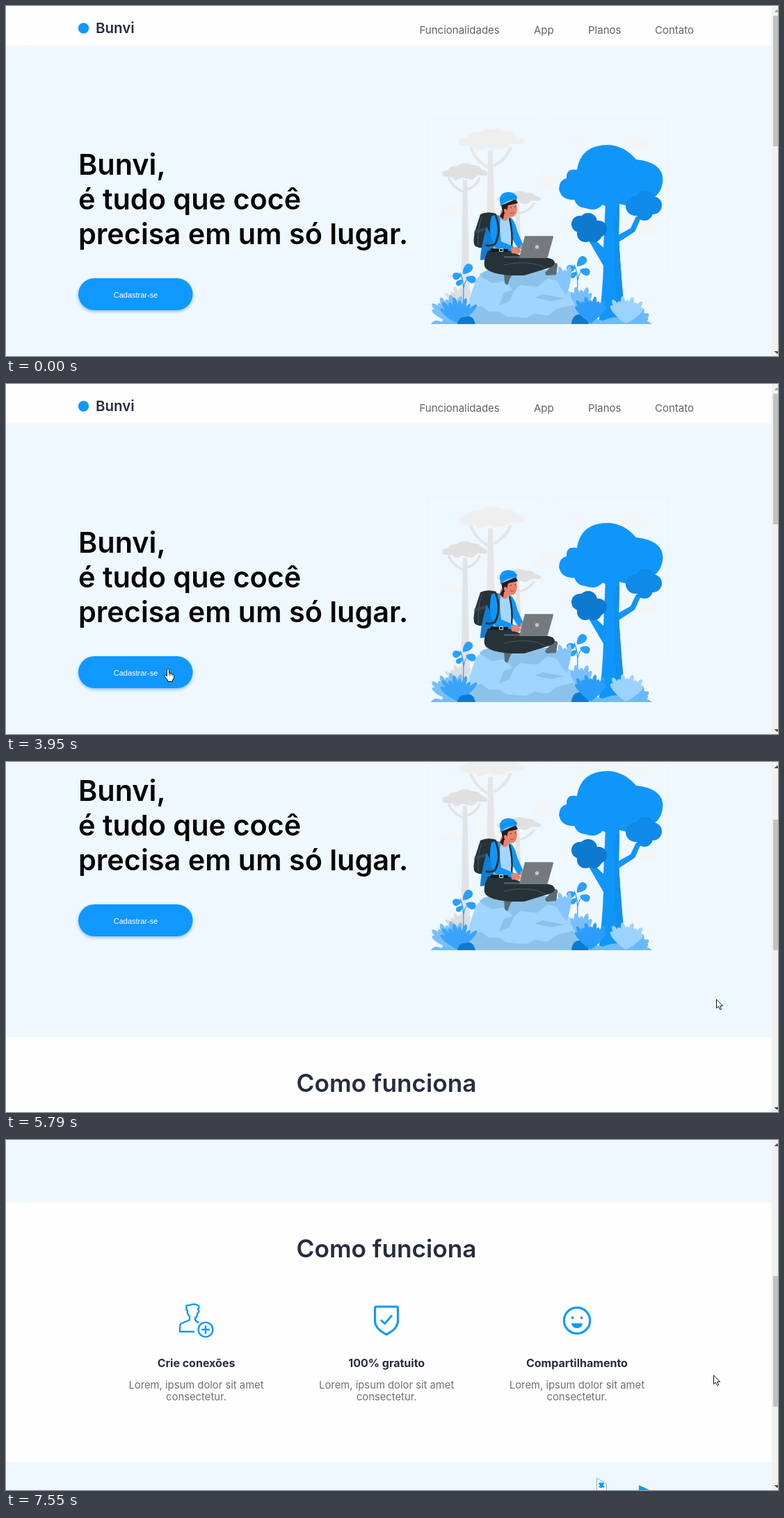
Recreate the animation shown at these times as an HTML page with a canvas. Size 1110 px wide and 504 px high, loop 8 s.

```html
<!DOCTYPE html>
<html lang="pt">
<head>
<meta charset="utf-8">
<title>Bunvi</title>
<style>
html, body { margin: 0; width: 100%; height: 100%; overflow: hidden; background: #fefefe; }
canvas { display: block; }
</style>
</head>
<body>
<canvas id="stage" width="1110" height="504"></canvas>
<script>
const ctx = document.getElementById('stage').getContext('2d');
const LOOP = 8000;
const BLUE = '#1098ff', TREE = '#1096f8', DARK = '#263238', INK = '#252d40';
const PALE = '#eff7ff', SKIN = '#e8836c', ROCK = '#9fd5ff', ROCK_SHADE = '#8cc2ea';
const SANS = 'Inter, sans-serif';

// ---------- drawing helpers ----------
function rect(color, x, y, w, h) {
  ctx.fillStyle = color;
  ctx.fillRect(x, y, w, h);
}
function fill(color, d) {
  ctx.fillStyle = color;
  ctx.fill(new Path2D(d));
}
function line(color, width, d) {
  ctx.strokeStyle = color;
  ctx.lineWidth = width;
  ctx.stroke(new Path2D(d));
}
function oval(color, x, y, rx, ry = rx) {
  ctx.fillStyle = color;
  ctx.beginPath();
  ctx.ellipse(x, y, rx, ry, 0, 0, Math.PI * 2);
  ctx.fill();
}
function ring(color, width, x, y, r) {
  ctx.strokeStyle = color;
  ctx.lineWidth = width;
  ctx.beginPath();
  ctx.arc(x, y, r, 0, Math.PI * 2);
  ctx.stroke();
}
function text(str, x, y, font, color, align = 'left') {
  ctx.font = font;
  ctx.fillStyle = color;
  ctx.textAlign = align;
  ctx.fillText(str, x, y);
}
function leaf(color, x, y, deg, len, w) {
  ctx.save();
  ctx.translate(x, y);
  ctx.rotate(deg * Math.PI / 180);
  fill(color, `M0 0C${len * .4} ${-w} ${len} ${-w} ${len} 0C${len} ${w} ${len * .4} ${w} 0 0Z`);
  ctx.restore();
}
// Leaves spread from one root; every second leaf is shorter
function fan(color, x, y, len, n, from, to, w = 4.5) {
  for (let i = 0; i < n; i++) {
    leaf(color, x, y, from + (to - from) * i / (n - 1), len * (i % 2 ? 1 : .86), w);
  }
}
function cloud(x, y, w) {
  fill('#f3f5f6', `M${x} ${y}q${w * .02} ${-w * .2} ${w * .22} ${-w * .2}q${w * .08} ${-w * .24} ${w * .3} ${-w * .22}` +
    `q${w * .2} ${w * .02} ${w * .22} ${w * .2}q${w * .24} 0 ${w * .26} ${w * .22}Z`);
}
// Flat savanna crown inside the box x, y, w, h
function crown(color, x, y, w, h) {
  const X = f => x + w * f, Y = f => y + h * f;
  fill(color, `M${X(.06)} ${Y(.78)}Q${X(-.04)} ${Y(.5)} ${X(.16)} ${Y(.4)}Q${X(.18)} ${Y(.16)} ${X(.36)} ${Y(.16)}` +
    `Q${X(.48)} ${Y(-.12)} ${X(.66)} ${Y(.12)}Q${X(.84)} ${Y(.12)} ${X(.86)} ${Y(.36)}Q${X(1.04)} ${Y(.5)} ${X(.97)} ${Y(.72)}` +
    `L${X(.78)} ${Y(.72)}L${X(.66)} ${Y(.98)}L${X(.47)} ${Y(.84)}L${X(.32)} ${Y(1)}L${X(.24)} ${Y(.82)}Z`);
}

// ---------- illustration ----------
function backdrop() {
  line('#edf5fc', 1, 'M606.5 390V162.5H770.5V390M785.5 390V162.5H951.5V390M575 429.5H985');
  cloud(806, 196, 27);
  cloud(878, 205, 48);
  cloud(756, 261, 46);
  cloud(626, 299, 30);
  cloud(903, 328, 38);

  fill('#e6e6e7', 'M693 208H700L705 390H690Z');
  line('#e6e6e7', 4, 'M668 203Q674 222 695 234M726 203Q718 222 701 230');
  crown('#efefef', 648, 176, 99, 32);
  fill('#e2e3e4', 'M657 250H663L667 430H654Z');
  line('#e2e3e4', 3.5, 'M636 247Q643 262 658 268M681 247Q677 260 663 264');
  crown('#e0e0e0', 625, 226, 68, 25);
  fill('#e2e3e4', 'M733 284H738L742 390H732Z');
  line('#e2e3e4', 3, 'M714 283Q720 295 734 302M760 283Q754 295 738 299');
  crown('#e0e0e0', 704, 266, 66, 20);
  fan('#dcdee0', 656, 432, 30, 7, -160, -65, 4);
}

function bigTree() {
  fill(TREE, 'M862 282H882L881 335Q885 400 891 458H852Q858 410 859 374L838 338L844 334L859 348Z');
  fill('#1190ee', 'M877 290H882L881 335Q885 400 891 458H882Q872 390 877 290Z');
  fill(TREE, 'M880 330L898 320L906 303L913 305L904 325L881 340Z');
  fill(TREE, 'M821 236Q826 200 866 200Q889 201 906 221Q944 225 944.5 250Q943 270 929 277Q905 292 882 285' +
    'Q871 295 858 286Q848 297 833 291Q821 290 817 279Q798 280 795 263Q796 250 806 248Q805 233 821 236Z');
  const right = '#0f8ae8', left = '#0e7acf';
  oval(right, 905, 288, 14);
  oval(right, 919, 280, 14);
  oval(right, 930, 287, 13);
  oval(right, 918, 297, 12);
  oval(left, 825, 314, 12);
  oval(left, 837, 311, 13);
  oval(left, 852, 321, 12);
  oval(left, 833, 328, 12);
  oval(left, 845, 328, 12);
}

function rock() {
  fill(ROCK, 'M663 458L666 422L676 394L687 382H790L800 402L814 414L831 458Z');
  fill(ROCK_SHADE, 'M663 458L664 436L684 432L694 440L709 440L719 447L748 449L760 443L779 446L792 436L816 430L831 458Z');
  fill(ROCK_SHADE, 'M681 386L694 380H788L797 397L779 392L764 404L739 402L730 410L717 396L699 399L684 391Z');
  fill(ROCK_SHADE, 'M716 413L731 408L724 425L709 431ZM760 420L772 415L803 421L784 425Z');
}

// Stems with broad leaves around a fork at x, y
function sprig(x, y) {
  const c = '#2a9ffb';
  line(c, 1.3, `M${x} ${y + 44}Q${x + 3} ${y + 12} ${x - 4} ${y - 2}M${x + 1} ${y + 20}Q${x + 3} ${y + 6} ${x + 13} ${y + 3}`);
  leaf(c, x, y, -48, 18, 8);
  leaf(c, x - 2, y + 1, 165, 13, 7);
  leaf(c, x + 4, y + 5, 18, 15, 7);
  leaf(c, x, y + 8, 140, 12, 5);
}

function plants() {
  sprig(657, 386);
  sprig(821, 375);
  fan('#86c5fb', 806, 416, 42, 4, -115, -84, 5);
  fan('#78bffa', 826, 440, 36, 5, -115, -60, 5);
  fill('#6fbbf9', 'M611 458Q616 450 626 455Q634 443 650 451L676 458ZM824 458Q834 445 858 453Q878 444 902 451Q920 450 929 458Z');
  fan('#78bffa', 642, 456, 40, 8, -148, -72, 5);
  fan('#3ba4fa', 650, 457, 38, 8, -140, -45, 4.5);
  fill('#0e7acf', 'M649 458Q651 446 661 448Q671 443 675 458ZM813 458Q814 444 825 444Q836 446 838 458Z');
  fan('#2c9dfa', 841, 457, 39, 9, -132, -50, 4.5);
  fan('#69b8fa', 903, 457, 25, 5, -70, -20, 5);
  fan('#9bd2ff', 891, 457, 39, 9, -130, -42, 5);
}

function person() {
  // backpack
  fill(DARK, 'M682 300Q692 295 705 299L699 346Q685 351 675 346Q670 342 675 322Z');
  fill('#37474f', 'M674 323L693 318L691 323L673 328Z');
  line('#455a64', 1, 'M684 304Q678 318 679 345');
  // shirt and jacket
  fill('#a5d6ff', 'M706 304L723 303L727 330L724 352H700Z');
  fill('#0f7ed5', 'M691 318L703 340L697 364L682 366Q682 350 691 318Z');
  fill(TREE, 'M723 303Q731 306 735 324L744 345L737 350L727 334Z');
  line(DARK, 2.5, 'M724 306Q729 325 727 347');
  fill(TREE, 'M698 303Q706 299 711 303Q709 320 712 339L731 347L727 355L703 348Q692 328 698 303Z');
  line(DARK, 3, 'M704 301Q713 324 703 343Q694 347 690 344');
  // head
  fill(SKIN, 'M712 294L724 299L722 307Q716 313 709 304Z');
  fill(SKIN, 'M716 286L733 281L735 292Q734 303 727 304Q718 303 715 292Z');
  fill('#211f24', 'M712 287L733 278L736 284L731 285L722 287L720 295L716 300L715 307L710 303L714 296Z');
  oval(SKIN, 718, 295, 2, 3);
  fill(BLUE, 'M711 288L710 279Q710 269 721 268Q731 267 735 275L734 279Q721 279 711 288Z');
  line('#0f7ed5', 1.1, 'M711 281Q720 273 734 275');
  oval(DARK, 726, 290, .8);
  oval(DARK, 732, 289, .8);
  line('#9c4a3c', 1, 'M725 298Q729 300 731 297');
  // legs and shoes
  fill('#5b6a72', 'M716 384L728 386L724 394L721 402L717 399ZM775 384L787 371Q793 368 793 374L791 387L777 388Z');
  fill(DARK, 'M693 352L718 350L746 362Q773 359 786 365Q794 372 781 377L745 388Q701 389 690 378Q684 371 693 352Z');
  line('#455a64', 1, 'M716 373Q740 367 763 372L776 377');
  fill('#151b1e', 'M697 349L722 350L721 354L696 354Z');
  line('#dfe5e8', 1, 'M709.5 349.5H714.5V353.5H709.5Z');
  // hands and laptop
  fill(SKIN, 'M726 348L734 347L741 353L737 357L727 356ZM741 343L746 346L744 351L738 350Z');
  fill('#50575b', 'M715 360H778L777 363H717Z');
  fill('#747a7e', 'M746 331H785Q787 331 787 333L779 361Q778 363 776 363H738Z');
  line('#8f9599', 1, 'M746 331.5H785');
  oval('#c3c7ca', 763.5, 347, 2.8);
}

// ---------- page ----------
function header() {
  oval(BLUE, 111.5, 32, 7.7);
  text('Bunvi', 129, 38.5, '600 20.5px ' + SANS, INK);
  const nav = { Funcionalidades: 594.5, App: 759, Planos: 837, Contato: 933 };
  for (const item in nav) text(item, nav[item], 39.5, '15px ' + SANS, '#5f6368');
}

function hero() {
  rect(PALE, 0, 57, 1101, 526);
  ['Bunvi,', 'é tudo que cocê', 'precisa em um só lugar.'].forEach((s, i) =>
    text(s, 104, 243 + 50 * i, '600 41.4px ' + SANS, '#050505'));
  ctx.save();
  ctx.shadowColor = 'rgba(20, 120, 210, .45)';
  ctx.shadowBlur = 4;
  ctx.shadowOffsetY = 2;
  ctx.fillStyle = BLUE;
  ctx.beginPath();
  ctx.roundRect(104, 392, 164.5, 46, 23);
  ctx.fill();
  ctx.restore();
  text('Cadastrar-se', 186.5, 419.5, '11px "Liberation Sans", Arial, sans-serif', '#fff', 'center');
  backdrop();
  bigTree();
  rock();
  plants();
  person();
}

function icons() {
  line(BLUE, 2.4, 'M271 769H250V762Q250 757 255 756L262 753Q265 752 264 747Q260 743 261 739Q258 737 260 735' +
    'Q257 730 264 731Q270 728 276 731Q279 733 276 737Q279 740 275 743Q275 748 272 749V752Q274 755 277 756');
  ring(BLUE, 2.4, 287, 766, 10.4);
  line(BLUE, 2.4, 'M287 760V772M281 766H293');
  line(BLUE, 3.2, 'M530.5 735Q530.5 733 532.5 733H561.5Q563.5 733 563.5 735V754Q563 765 547 773Q531 765 530.5 754Z');
  line(BLUE, 2.8, 'M539 752L544.5 757.5L555 745.5');
  ring(BLUE, 3.2, 821, 753, 18.7);
  oval(BLUE, 814.5, 749, 1.9);
  oval(BLUE, 827.5, 749, 1.9);
  fill(BLUE, 'M813 757H829Q828 764 821 764Q814 764 813 757Z');
}

function features() {
  text('Como funciona', 547, 662, '600 35.2px ' + SANS, INK, 'center');
  icons();
  ['Crie conexões', '100% gratuito', 'Compartilhamento'].forEach((title, i) => {
    const x = 273.5 + 273.7 * i;
    text(title, x, 820, '700 16px ' + SANS, INK, 'center');
    text('Lorem, ipsum dolor sit amet', x, 851, '14.8px ' + SANS, '#6c7076', 'center');
    text('consectetur.', x, 868, '14.8px ' + SANS, '#6c7076', 'center');
  });
}

function nextSection() {
  rect(PALE, 0, 957, 1101, 300);
  fill('#fafdff', 'M849 980L864 988V1008L849 1000Z');
  line('#6fbcf8', 1, 'M849.5 980L863.5 988V1008L849.5 1000Z');
  line(BLUE, 2.4, 'M856 986V994M852.5 987L860 993M853 993L859.5 987');
  fill(BLUE, 'M910 990L925 997H934V1010H910Z');
}

function scrollbar(y) {
  rect('#f1f1f1', 1101, 0, 9, 504);
  rect('#c1c1c1', 1103, Math.round(14 + .37 * y), 7, 188);
  fill(y > 0 ? '#505050' : '#a3a3a3', 'M1104.5 9L1108.5 5L1112.5 9Z');
  fill('#505050', 'M1104.5 497L1108.5 501L1112.5 497Z');
}

// ---------- motion ----------
// Bursts of movement: first step, last step, number of steps
const BURSTS = [[450, 1240, 13], [1320, 1520, 3], [2590, 3330, 12], [3400, 3400, 1], [3600, 4370, 12],
  [4440, 5190, 12], [5260, 6000, 12], [6210, 6280, 2], [6590, 6810, 4], [7000, 7550, 8]];
// Wheel notches: start, duration
const NOTCHES = [[5190, 320], [5470, 320], [5680, 320], [6590, 220], [7000, 320], [7230, 320]];
const NOTCH = 82.2;
// Pointer: time, x, y
const TRACK = [[384, 1074, 505], [1240, 1029, 386], [1520, 1011, 368], [2520, 1011, 368], [2800, 840, 328],
  [2990, 540, 317], [3330, 216, 404], [3400, 191, 414], [3530, 191, 414], [3950, 233, 409], [4370, 431, 406],
  [4720, 700, 385], [5190, 1034, 343], [5450, 1022, 342], [6000, 1020, 341], [6140, 1020, 341], [6280, 1017, 338]];

function snap(t) {
  const burst = BURSTS.filter(b => b[0] <= t).pop();
  if (!burst) return 0;
  const [start, end, n] = burst;
  if (n === 1) return start;
  const step = (end - start) / (n - 1);
  return start + step * Math.min(n - 1, Math.floor((t - start) / step + .25));
}
function ease(p) {
  return p < .5 ? 2 * p * p : 1 - 2 * (1 - p) ** 2;
}
function scrollAt(t) {
  const sum = NOTCHES.reduce((s, [start, dur]) => s + ease(Math.min(1, Math.max(0, (t - start) / dur))), 0);
  return Math.round(sum * NOTCH);
}
function pointerAt(t) {
  const next = TRACK.findIndex(k => k[0] > t);
  if (next === 0) return null;
  if (next < 0) return TRACK[TRACK.length - 1].slice(1);
  const a = TRACK[next - 1], b = TRACK[next], p = (t - a[0]) / (b[0] - a[0]);
  return [1, 2].map(i => Math.round(a[i] + (b[i] - a[i]) * p));
}

function pointer(x, y, scroll) {
  const py = y + scroll;
  const hand = x > 104 && x < 268 && py > 392 && py < 438;
  const shape = hand
    ? 'M4.5 1.8Q6-.4 7.5 1.8V7.5Q9 6.5 10 8Q11.5 7.2 12.3 8.7Q14.3 8.5 14.5 10.5V14L12.5 17.5V19.5H5.5V17.5L1 12Q.3 9.8 2.5 10L4.5 12Z'
    : 'M.5.8V13.6L3.4 11L5.6 15.6L7.6 14.7L5.6 10.2H9.6Z';
  ctx.save();
  ctx.translate(hand ? x - 6 : x, y);
  fill('#fff', shape);
  line('#111', 1, shape);
  if (hand) line('#111', .8, 'M7.5 7.5V11M10 8V11M12.3 8.7V11.5');
  ctx.restore();
}

function draw(now) {
  const t = snap(now % LOOP);
  const scroll = scrollAt(t);
  rect('#fefefe', 0, 0, 1110, 504);
  ctx.save();
  ctx.translate(0, -scroll);
  header();
  hero();
  features();
  nextSection();
  ctx.restore();
  scrollbar(scroll);
  const at = pointerAt(t);
  if (at) pointer(at[0], at[1], scroll);
}

let began;
function tick(now) {
  began ??= now;
  draw(now - began);
  requestAnimationFrame(tick);
}
requestAnimationFrame(tick);
</script>
</body>
</html>
```
